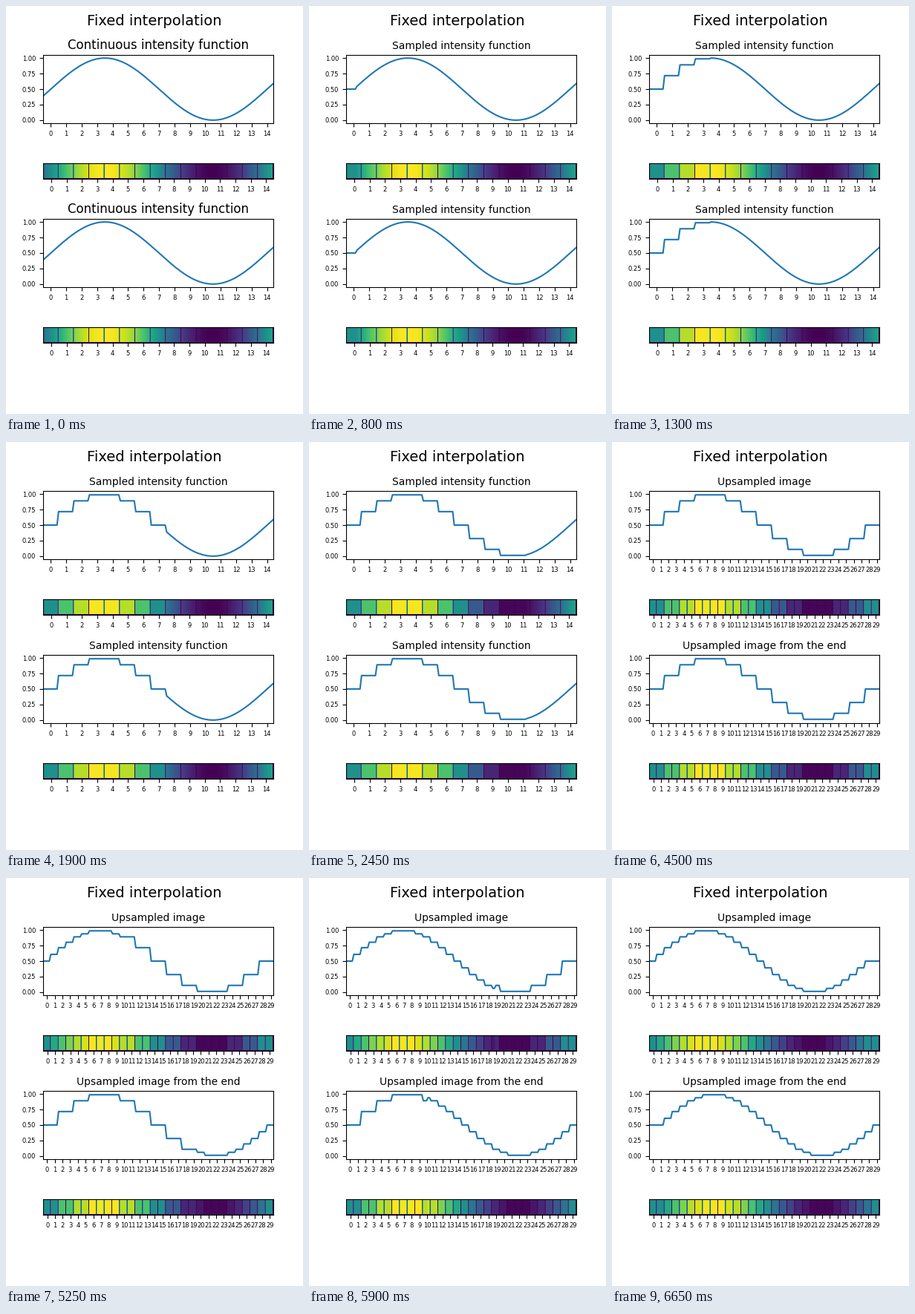
Recreate the animation shown at these times as a matplotlib script. Size 400 px wide and 550 px high, loop 8 s.

```python
import numpy as np
import matplotlib.pyplot as plt
from matplotlib.animation import FuncAnimation

INTERVAL, FRAMES = 50, 160
CELLS, PER_CELL = 15, 10
SAMPLES = CELLS * PER_CELL
SCALE = 2  # strip columns per sample
SWEEP_STEPS = 45
SAMPLING_START, UPSAMPLING_START = 15, 90


def intensity(x):
    return 0.5 + 0.5 * np.sin(2 * np.pi * x / 14)


def upsample(first, second):
    """Interleave two half-cells per cell, expanded to full sample length."""
    return np.repeat(np.column_stack([first, second]).ravel(), PER_CELL // 2)


cell_values = intensity(np.arange(CELLS))
continuous = intensity(np.arange(SAMPLES) / PER_CELL - 0.5)
sampled = np.repeat(cell_values, PER_CELL)
following = np.append(cell_values[1:], cell_values[-1])
preceding = np.insert(cell_values[:-1], 0, cell_values[0])
from_start = upsample(cell_values, (cell_values + following) / 2)
from_end = upsample((preceding + cell_values) / 2, cell_values)


def sweep(old, new, step, reverse=False):
    edge = round(SAMPLES * min(max(step, 0), SWEEP_STEPS) / SWEEP_STEPS)
    if reverse:
        return np.append(old[:SAMPLES - edge], new[SAMPLES - edge:])
    return np.append(new[:edge], old[edge:])


def strip_image(values, cells):
    """Spread the samples over a strip, with zero-valued cell separators."""
    width = SAMPLES * SCALE // cells
    image = np.tile(np.repeat(values, SCALE), (PER_CELL * SCALE, 1))
    image[:, width - 1::width] = 0
    image[-1] = 0
    return image


def set_cells(cells):
    width = SAMPLES / cells
    ticks = np.arange(cells) * width + width / 2
    for ax, factor in zip(axes, (1, SCALE) * 2):
        ax.set_xticks(ticks * factor, [str(i) for i in range(cells)])


fig, axes = plt.subplots(4, 1, figsize=(4, 5.5), dpi=100)
fig.suptitle("Fixed interpolation", fontsize=14)
curve_axes, strip_axes = axes[::2], axes[1::2]
lines, strips = [], []
for ax in curve_axes:
    lines.append(ax.plot(continuous, lw=1.5)[0])
    ax.set_xlim(0, SAMPLES - 1)
    ax.set_ylim(-0.05, 1.05)
    ax.set_yticks(np.linspace(0, 1, 5))
for ax in strip_axes:
    strips.append(ax.imshow(strip_image(continuous, CELLS), vmin=0, vmax=1))
    ax.set_yticks([])
for ax in axes:
    ax.tick_params(labelsize=6)
set_cells(CELLS)


def update(frame):
    cells = CELLS
    if frame < UPSAMPLING_START:
        step = frame - SAMPLING_START + 1
        rows = [sweep(continuous, sampled, step)] * 2
        name, size = ("Sampled", 10) if step > 0 else ("Continuous", 12)
        titles = [f"{name} intensity function"] * 2
    else:
        cells, size = 2 * CELLS, 10
        step = frame - UPSAMPLING_START + 1
        rows = [sweep(sampled, from_start, step),
                sweep(sampled, from_end, step, reverse=True)]
        titles = ["Upsampled image", "Upsampled image from the end"]

    if len(axes[0].get_xticks()) != cells:
        set_cells(cells)
    for ax, line, strip, row, title in zip(curve_axes, lines, strips, rows, titles):
        ax.set_title(title, fontsize=size)
        line.set_ydata(row)
        strip.set_data(strip_image(row, cells))
    return lines + strips


anim = FuncAnimation(fig, update, frames=FRAMES, interval=INTERVAL,
                     repeat=True, repeat_delay=0)
plt.show()
```
